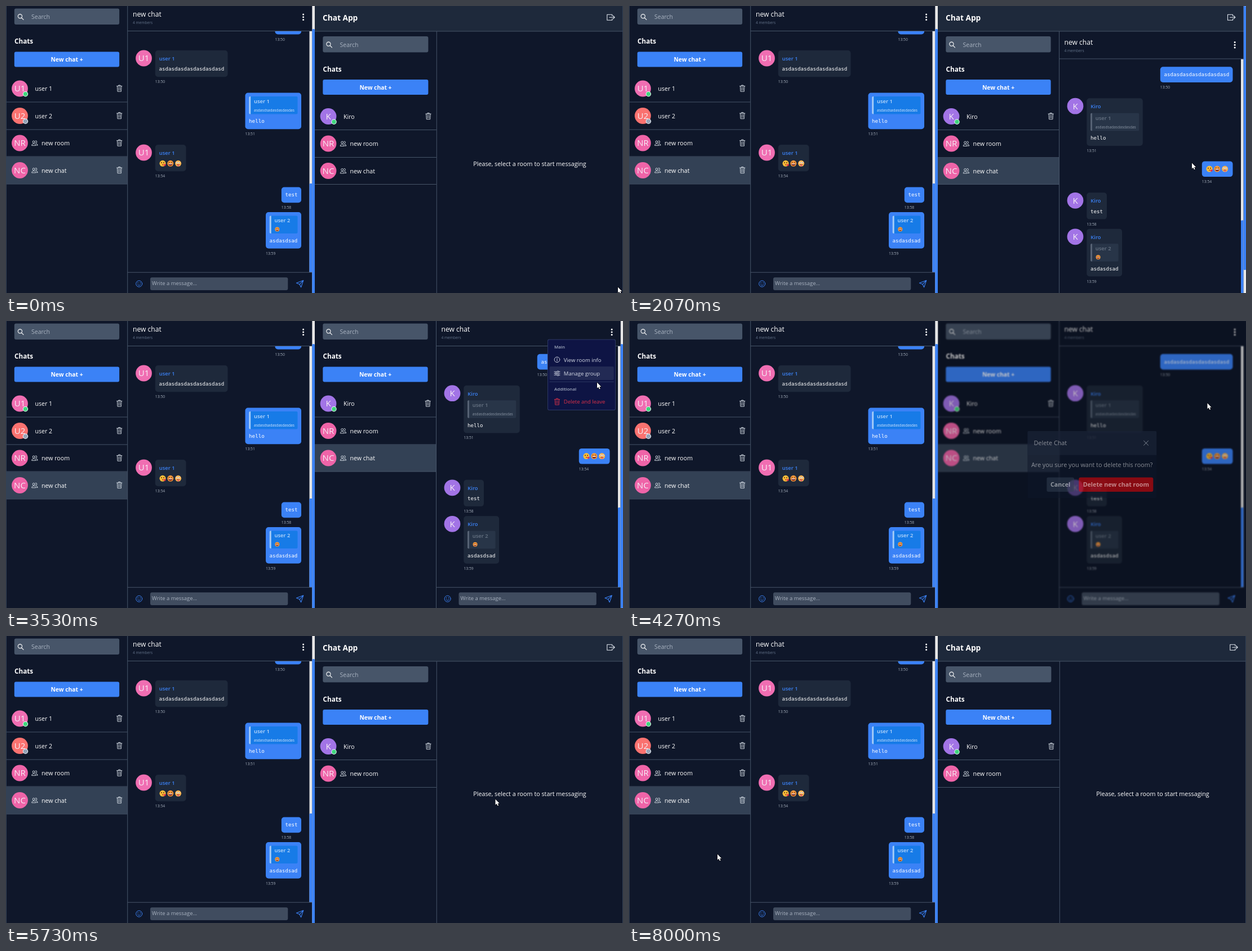
An HTML page with a canvas that plays this animation: 1095 px wide and 511 px high, repeating every 8.94 s.

```html
<!DOCTYPE html>
<html lang="en">
<head>
<meta charset="utf-8">
<title>Chat rooms</title>
<style>
html, body { margin: 0; width: 100%; height: 100%; overflow: hidden; background: #0f172a; }
canvas { display: block; }
</style>
</head>
<body>
<canvas id="stage" width="1095" height="511"></canvas>
<script>
const canvas = document.getElementById('stage');
const ctx = canvas.getContext('2d');
const LOOP = 8940, HEADER = 49.5, SIDE = 547.5, ROW = 48.5;
const BG = '#0f172a', PANEL = '#1e293b', LINE = '#475569', SELECTED = '#334155';
const BLUE = '#3b82f6', WHITE = '#fff', MUTED = '#94a3b8', TRACK = '#e6e6e6';
const PINK = '#ef64a8', ROSE = '#f06eb2', CORAL = '#fa7270', PURPLE = '#a274e6';
const SANS = '"Open Sans", "Noto Sans", sans-serif';
const MONO = '"DejaVu Sans Mono", monospace';
const FRIEND = 'Kiro';

const ICONS = {
  search: 'M2.5-1A3.6 3.6 0 1 1-4.7-1A3.6 3.6 0 1 1 2.5-1ZM1.5 1.7L5 5.2',
  trash: 'M-4.6-4H4.6M-1.6-4V-5.6H1.6V-4M-3.8-4L-3.2 5.6H3.2L3.8-4M-1.3-2V3.6M1.3-2V3.6',
  group: 'M.2-2A2 2 0 1 1-3.8-2A2 2 0 1 1 .2-2ZM-5.3 4C-5.3 0 1.7 0 1.7 4ZM1.4-4A2 2 0 1 1 1.4-.1M2.6 1.2Q5.2 1.5 5.2 4H3',
  smile: 'M5.5 0A5.5 5.5 0 1 1-5.5 0A5.5 5.5 0 1 1 5.5 0M-2.7 1.3Q0 4.4 2.7 1.3M-2-2.2V-1M2-2.2V-1',
  send: 'M6.2-6.2L2 6L-.6.8L-6.2-1.6ZM6.2-6.2L-.6.8',
  logout: 'M2.5-2.5V-5H-6.5V5H2.5V2.5M-2.5 0H6.8M4.2-2.7L6.9 0L4.2 2.7',
  info: 'M4.8 0A4.8 4.8 0 1 1-4.8 0A4.8 4.8 0 1 1 4.8 0M0-.8V2.6M0-2.8V-2',
  sliders: 'M-5-3H0M3-3H5M3-3A1.4 1.4 0 1 1 .2-3A1.4 1.4 0 1 1 3-3M-5 0H-3.4M-.6 0H5M-.6 0A1.4 1.4 0 1 1-3.4 0A1.4 1.4 0 1 1-.6 0M-5 3H0M3 3H5M3 3A1.4 1.4 0 1 1 .2 3A1.4 1.4 0 1 1 3 3',
  close: 'M-4-4L4 4M4-4L-4 4'
};
for (const k in ICONS) ICONS[k] = new Path2D(ICONS[k]);
const ARROW = new Path2D('M0 0V10.2L2.3 8.1L3.9 11.7L5.7 10.9L4.1 7.4H7.2Z');
const HAND = new Path2D('M-1.2 1Q0-.8 1.2 1V5Q2.4 4.3 3.2 5.3Q4.4 4.7 5.1 5.8Q6.7 5.4 6.7 7V10.5L5.5 14.5H-.4L-3.7 9.2Q-4-.1 -1.2 8.6Z'.replace('-4-.1', '-4 7'));

function rect(x, y, w, h, fill, r = 0) {
  ctx.fillStyle = fill;
  ctx.beginPath();
  ctx.roundRect(x, y, w, h, r);
  ctx.fill();
}

function disc(x, y, r, fill) {
  ctx.fillStyle = fill;
  ctx.beginPath();
  ctx.arc(x, y, r, 0, Math.PI * 2);
  ctx.fill();
}

function text(s, x, y, size, fill = WHITE, weight = 400, align = 'left', family = SANS) {
  ctx.font = `${weight} ${size}px ${family}`;
  ctx.textAlign = align;
  ctx.fillStyle = fill;
  ctx.fillText(s, x, y);
}

function icon(name, x, y, color = '#e2e8f0', width = 1) {
  ctx.save();
  ctx.translate(x, y);
  ctx.strokeStyle = color;
  ctx.lineWidth = width;
  ctx.lineJoin = ctx.lineCap = 'round';
  ctx.stroke(ICONS[name]);
  ctx.restore();
}

function at(x, y, draw) {
  ctx.save();
  ctx.translate(x, y);
  draw();
  ctx.restore();
}

function avatar(label, x, y, color, status) {
  disc(x, y, 14.4, color);
  text(label, x, y + 5.4, 15, '#f6edf5', 500, 'center');
  if (status) {
    disc(x + 10, y + 9.8, 4.7, '#f1f5f9');
    disc(x + 10, y + 9.8, 3.7, status);
  }
}

// kind: 0 kiss, 1 laugh, 2 tongue
function emoji(kind, x, y, r) {
  at(x, y, () => {
    ctx.scale(r / 5.5, r / 5.5);
    disc(0, 0, 5.5, ['#fbbf3a', '#f59a3c', '#f8b04a'][kind]);
    if (kind === 1) {
      rect(-3.4, .2, 6.8, 3.8, '#7a2620', [0, 0, 3.4, 3.4]);
      rect(-2.8, .2, 5.6, 1.2, WHITE);
      rect(-3.4, -2.4, 2.3, 1, '#5b2a16');
      rect(1.1, -2.4, 2.3, 1, '#5b2a16');
      return;
    }
    const eye = kind ? 1.7 : 1;
    for (const s of [-2, 2]) {
      disc(s, -1.4, eye, kind ? WHITE : '#5b2a16');
      if (kind) disc(s, -1.4, .7, '#4a2412');
    }
    if (kind) {
      rect(-2.4, 1.6, 4.8, 1, '#7a2620', .5);
      rect(-1, 2, 2.6, 2.8, '#ee5a78', 1.2);
    } else {
      rect(-1, 1.2, 1.8, 2.2, '#9c4a1c', .9);
      disc(2.6, 2.4, 1.3, '#e8304a');
      disc(4.4, 2.4, 1.3, '#e8304a');
      disc(3.5, 3.5, 1.3, '#e8304a');
    }
  });
}

function sidebar(rows, selected, extra = 0) {
  const width = 186.3 + extra;
  rect(14.8, 4.5, width, 28.5, LINE, 3);
  icon('search', 26, 19.2, WHITE, 1.1);
  text('Search', 45, 23.3, 10.5, '#a9b3c1');
  text('Chats', 15, 67.3, 11.7, WHITE, 700);
  rect(14.8, 81.5, width, 27, BLUE, 3);
  text('New chat +', 108 + extra / 2, 99, 10.3, WHITE, 700, 'center');
  rows.forEach(({ name, tag, color, status, trash }, i) => {
    const y = 122.7 + i * ROW, mid = y + 24.3;
    if (i === selected) rect(.5, y, 215, ROW, SELECTED);
    rect(.5, Math.round(y + ROW) - .5, 215 + extra, 1, LINE);
    avatar(tag, 24.5, mid, color, status);
    if (!status) icon('group', 51, mid, '#dbe2ea', .9);
    text(name, status ? 51.5 : 63, mid + 4.2, 10.6);
    if (trash) icon('trash', 201.2 + extra, mid - .4, '#dbe2ea', .9);
  });
}

function message(m, sender, tag, color) {
  const [x, y, w, h, mine, time, body, quoteName, quote] = m;
  rect(x, y, w, h, mine ? BLUE : PANEL, 5);
  if (!mine) {
    avatar(tag, x - 20.3, y + 14, color);
    text(sender, x + 7, y + 18, 9.4, BLUE, 600);
  }
  if (quoteName) {
    const qy = y + (mine ? 6.5 : 26.5), tint = mine ? '#bcd9fa' : '#687484';
    rect(x + 6.7, qy, w - 13.2, 31.5, mine ? '#177be7' : '#283548', 2);
    rect(x + 6.7, qy, 3, 31.5, mine ? '#a5cbf8' : '#566274', [2, 0, 0, 2]);
    text(quoteName, x + 15.5, qy + 11.8, 9.4, tint, 600);
    if (quote === '*') emoji(1, x + 20.3, qy + 24, 4);
    else text(quote, x + 15.5, qy + 27, 6.6, mine ? '#d7e7fc' : '#8a95a4');
  }
  if (body === '*') for (let i = 0; i < 3; i++) emoji(i, x + 13.2 + i * 13.8, y + h - 14, 5.5);
  else text(body, x + 6.6, y + h - 10.9, 9.17, WHITE, 400, 'left', MONO);
  text(time, x, y + h + 11, 6.8, '#a3adba');
}

function chat(list, sender, tag, color, thumb) {
  text('new chat', 225, 19.2, 12.1);
  text('4 members', 225, 32.2, 6.6, '#64748b');
  for (const y of [15, 19.7, 24.4]) disc(527.6, y, 1.5, WHITE);
  rect(216, 44, 327, 1, LINE);
  ctx.save();
  ctx.beginPath();
  ctx.rect(216, 45, 327, 429);
  ctx.clip();
  for (const m of list) message(m, sender, tag, color);
  rect(538.5, 45, 5, 429, TRACK);
  rect(538.5, thumb, 5, 474 - thumb, BLUE, 1.5);
  ctx.restore();
  rect(216, 473.7, 327, 1, LINE);
  icon('smile', 236.2, 494.6, BLUE);
  rect(256, 483.2, 244.3, 22.8, '#404c5f', 3);
  text('Write a message...', 259, 497.3, 9.45, '#a9b3c1');
  icon('send', 521.6, 494.8, BLUE, 1.1);
}

const LONG = 'asdasdasdasdasdasdasd', QUOTED = 'asdasdsadasdasdasdas';
const leftRows = [
  { name: 'user 1', tag: 'U1', color: ROSE, status: '#3fd67c', trash: true },
  { name: 'user 2', tag: 'U2', color: CORAL, status: MUTED, trash: true },
  { name: 'new room', tag: 'NR', color: PINK, trash: true },
  { name: 'new chat', tag: 'NC', color: PINK, trash: true }
];
const rightRows = [
  { name: FRIEND, tag: FRIEND[0], color: PURPLE, status: '#3fd67c', trash: true },
  { name: 'new room', tag: 'NR', color: PINK },
  { name: 'new chat', tag: 'NC', color: PINK }
];
const leftChat = [
  [477.5, 22, 46.5, 28.5, 1, '13:50', ''],
  [264.8, 79, 128.7, 47.3, 0, '13:50', LONG],
  [424.5, 154.5, 99.5, 64.8, 1, '13:51', 'hello', 'user 1', QUOTED],
  [264.8, 247, 54.7, 47.3, 0, '13:54', '*'],
  [488.8, 322.5, 35.2, 27.7, 1, '13:58', 'test'],
  [461, 367, 63, 64.8, 1, '13:59', 'asdasdsad', 'user 2', '*']
];
const rightChat = [
  [395.3, 58.8, 128.7, 27.7, 1, '13:50', LONG],
  [264.8, 114.7, 99.5, 84.7, 0, '13:51', 'hello', 'user 1', QUOTED],
  [469.3, 226.9, 54.7, 27.7, 1, '13:54', '*'],
  [264.8, 282.8, 35.7, 47.3, 0, '13:58', 'test'],
  [264.8, 347.3, 62.8, 84.7, 0, '13:59', 'asdasdsad', 'user 2', '*']
];

function leftPage() {
  sidebar(leftRows, 3);
  rect(0, 0, 1, 511, '#334155');
  rect(215.2, 0, 1, 511, LINE);
  chat(leftChat, 'user 1', 'U1', ROSE, 316);
  rect(543.3, 0, 4.7, 511, TRACK);
  rect(543.3, 41, 4.7, 470, BLUE, [1.5, 1.5, 0, 0]);
}

function rightPage(open, deleted, scroll, modal) {
  const extra = open ? 0 : .8;
  at(SIDE, HEADER - scroll, () => {
    sidebar(deleted ? rightRows.slice(0, 2) : rightRows, open ? 2 : -1, extra);
    rect(215.5 + extra, -5, 1, 520, LINE);
    if (open) chat(rightChat, FRIEND, FRIEND[0], PURPLE, 332);
  });
  at(0, -scroll, () => {
    rect(548, 0, 547, 45, PANEL);
    rect(548, 44.5, 547, 1, LINE);
    text('Chat App', 562, 25.8, 13.7, WHITE, 700);
    icon('logout', open ? 1069 : 1073.3, 20.2, '#e2e8f0', 1.1);
  });
  if (!open) {
    text('Please, select a room to start messaging', 929.5, 285, 10.75, WHITE, 400, 'center');
    rect(1094, 0, 1, 511, '#334155');
  } else if (!modal) {
    rect(1090.8, 0, 4.2, 511, TRACK);
    rect(1090.8, 41 * scroll / HEADER, 4.2, 470, BLUE, 1.5);
  }
}

function menu(hoverY) {
  rect(961, 32.5, 121, 126.5, '#2c3863', 3);
  rect(962, 33.5, 119, 124.5, '#0e1444', 2.5);
  const top = hoverY < 56 ? 0 : hoverY < 81 ? 56.5 : hoverY < 112 ? 81 : 131.5;
  if (top) rect(964.5, top, 114.3, 24, '#222a54', 2);
  rect(964.5, 107.7, 114.3, 1, '#2c3863');
  text('Main', 973, 49.4, 7.9, '#a3acc0', 600);
  text('Additional', 973, 124.2, 7.9, '#a3acc0', 600);
  const items = [['info', 'View room info', 68.8], ['sliders', 'Manage group', 93.2], ['trash', 'Delete and leave', 143.6]];
  for (const [name, label, y] of items) {
    const color = name === 'trash' ? '#dc3048' : '#d5dae6';
    icon(name, 978, y, color, .9);
    text(label, 989.8, y + 3.7, 9.5, color);
  }
}

function dialog(amount) {
  ctx.save();
  ctx.beginPath();
  ctx.rect(548, 0, 547, 511);
  ctx.clip();
  ctx.filter = `blur(${1.8 * amount}px) brightness(${1 - .42 * amount})`;
  ctx.drawImage(canvas, 0, 0);
  ctx.restore();
  ctx.globalAlpha = amount;
  rect(707.3, 196, 229, 119, BG, 2);
  rect(707.3, 196, 229, 42.7, PANEL, [2, 2, 0, 0]);
  text('Delete Chat', 718.5, 221.3, 10.8);
  icon('close', 917.6, 217.3);
  text('Are you sure you want to delete this room?', 821.7, 260.4, 10.8, WHITE, 400, 'center');
  rect(741.3, 278.5, 48.7, 25.5, SELECTED, 3);
  text('Cancel', 765.6, 295.4, 10.6, WHITE, 700, 'center');
  rect(798.3, 278.5, 132, 25.5, '#f00', 3);
  text('Delete new chat room', 864.3, 295.4, 10.7, WHITE, 700, 'center');
  ctx.globalAlpha = 1;
}

// time, x, y of the pointer tip
const path = [
  [70, 1086, 500.5], [930, 640, 290], [1600, 640, 290], [2070, 999, 279.5], [2470, 1033, 208.5],
  [2530, 1033, 208.5], [2930, 1076, 21], [3130, 1076, 21], [3400, 1064, 68], [3530, 1049, 109.5],
  [3800, 1030, 143], [4200, 1030, 143], [5000, 871, 290], [5400, 871, 290], [5730, 868.5, 290.5],
  [6270, 655, 260], [6330, 652, 262], [6930, 278, 370], [7270, 278, 370], [7620, 54, 284], [8000, 157, 388.5]
];

const clamp = v => Math.min(1, Math.max(0, v));
const smooth = v => (v = clamp(v), v * v * (3 - 2 * v));

function pointer(t) {
  const i = path.findIndex(p => p[0] > t);
  if (i === 0) return path[0].slice(1);
  if (i < 0) return path[path.length - 1].slice(1);
  const [t0, x0, y0] = path[i - 1], [t1, x1, y1] = path[i];
  const k = smooth((t - t0) / (t1 - t0));
  return [x0 + (x1 - x0) * k, y0 + (y1 - y0) * k];
}

function cursor(x, y, hand) {
  at(x, y, () => {
    const shape = hand ? HAND : ARROW;
    ctx.fillStyle = WHITE;
    ctx.strokeStyle = '#05070c';
    ctx.lineWidth = 1.4;
    ctx.lineJoin = 'round';
    ctx.stroke(shape);
    ctx.fill(shape);
  });
}

function draw(t) {
  const deleted = t >= 5430, open = t >= 1070 && !deleted;
  const modal = t >= 4200 && !deleted;
  const scroll = deleted ? 0 : HEADER * smooth((t - 2130) / 270);
  const [x, y] = pointer(t);
  rect(0, 0, 1095, 511, BG);
  leftPage();
  rightPage(open, deleted, scroll, modal);
  if (t >= 3060 && t < 4200) menu(t >= 3470 && t < 3600 ? 93 : y);
  if (modal) dialog(smooth((t - 4180) / 180));
  const onRow = t > 850 && t < 1680, onButton = t > 4800 && !deleted;
  cursor(x, y, onRow || onButton);
}

const start = performance.now();
function tick() {
  draw((performance.now() - start) % LOOP);
  requestAnimationFrame(tick);
}
tick();
</script>
</body>
</html>
```
